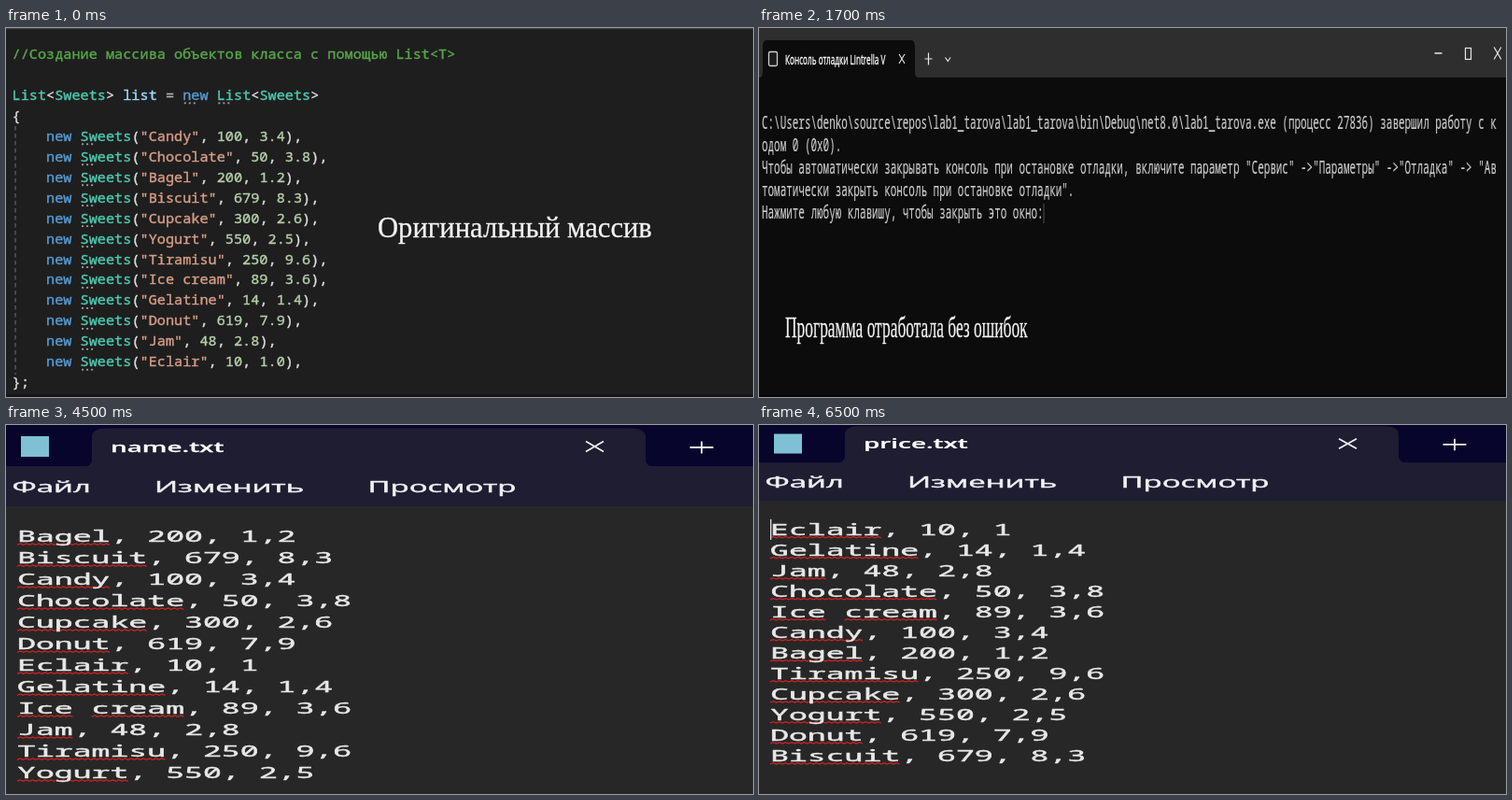
These frames come from a looping animation (800x395 px, 8000 ms). An HTML page:

```html
<!DOCTYPE html>
<html lang="ru">
<head>
<meta charset="utf-8">
<title>Сортировка списка</title>
<style>
  html, body { margin: 0; width: 100%; height: 100%; overflow: hidden; background: #1e1e1e; }
  svg { display: block; width: 100vw; height: 100vh; }
  text { white-space: pre; fill: currentColor; stroke: currentColor; }
  .mono { font-family: "Noto Sans Mono", "DejaVu Sans Mono", monospace; font-variant-ligatures: none; }
  .sans { font-family: "Open Sans", "Noto Sans", sans-serif; }
  .serif { font-family: "Liberation Serif", "Noto Serif", serif; }
</style>
</head>
<body>
<svg id="stage" viewBox="0 0 800 395" preserveAspectRatio="none"></svg>
<script>
const LOOP = 8000;
const STARTS = [0, 500, 2500, 4500, 6500];

const sweets = [
  ["Candy", 100, 3.4], ["Chocolate", 50, 3.8], ["Bagel", 200, 1.2],
  ["Biscuit", 679, 8.3], ["Cupcake", 300, 2.6], ["Yogurt", 550, 2.5],
  ["Tiramisu", 250, 9.6], ["Ice cream", 89, 3.6], ["Gelatine", 14, 1.4],
  ["Donut", 619, 7.9], ["Jam", 48, 2.8], ["Eclair", 10, 1]
];

const esc = s => s.replace(/&/g, "&amp;").replace(/</g, "&lt;").replace(/>/g, "&gt;");
const rect = (x, y, w, h, fill, extra = "") =>
  `<rect x="${x}" y="${y}" width="${w}" height="${h}" fill="${fill}" ${extra}/>`;
const line = (d, color, w = 1, extra = "") =>
  `<path d="${d}" fill="none" stroke="${color}" stroke-width="${w}" ${extra}/>`;
// sx is the horizontal scale of the text, heft thickens its strokes
const label = (cls, x, y, size, color, body, sx = 1, heft = 0, extra = "") =>
  `<text class="${cls}" transform="translate(${x} ${y}) scale(${sx} 1)" font-size="${size}" color="${color}" stroke-width="${heft}" ${extra}>${body}</text>`;
const cross = (x, y, rx, ry, color, w) =>
  line(`M${x - rx} ${y - ry}l${2 * rx} ${2 * ry}m0 ${-2 * ry}l${-2 * rx} ${2 * ry}`, color, w);
const plus = (x, y, rx, ry, color, w) =>
  line(`M${x - rx} ${y}h${2 * rx}M${x} ${y - ry}v${2 * ry}`, color, w);

// Code editor
function paint(code) {
  const rules = /(\/\/.*)|("[^"]*")|\b(new)\b|\b(List|Sweets)\b|\b(list)\b|(\d+(?:\.\d+)?)|(=)/g;
  const colors = ["#57a64a", "#d69d85", "#569cd6", "#4ec9b0", "#9cdcfe", "#b5cea8", "#b4b4b4"];
  let out = "", last = 0;
  for (const m of code.matchAll(rules)) {
    const kind = m.slice(1).findIndex(Boolean);
    out += esc(code.slice(last, m.index)) + `<tspan color="${colors[kind]}">${esc(m[0])}</tspan>`;
    last = m.index + m[0].length;
  }
  return out + esc(code.slice(last));
}

function editor() {
  const left = 6.5, step = 9.14, pitch = 21.95;
  const base = row => 33 + row * pitch;
  const hint = (col, row) => [2, 7, 12].map(dx =>
    rect(left + col * step + dx - 0.5, base(row) + 2.6, 2, 1.8, "#a0a0a0")).join("");
  const rows = [
    "//Создание массива объектов класса с помощью List<T>", "",
    "List<Sweets> list = new List<Sweets>", "{",
    ...sweets.map(([n, p, w]) => `    new Sweets("${n}", ${p}, ${w.toFixed(1)}),`),
    "};"
  ];
  return rect(0, 0, 800, 395, "#1e1e1e") +
    rect(0, 0, 800, 1.3, "#414143") + rect(0, 392.5, 800, 2.5, "#171217") +
    line("M10 105V371", "#707070", 1, 'stroke-dasharray="4.5 3.5"') +
    rows.map((r, i) => label("mono", left, base(i), step / 0.6, "#dcdcdc", paint(r), 1, 0.4)).join("") +
    hint(20, 2) + hint(24, 2) + sweets.map((s, i) => hint(8, i + 4)).join("") +
    label("serif", 398, 224, 30.6, "#f2f2f2", "Оригинальный массив", 1, 0.3);
}

// Debug console
function terminal() {
  const sx = 0.5467, ink = "#e8e8e8";
  const rows = [
    String.raw`C:\Users\denko\source\repos\lab1_tarova\lab1_tarova\bin\Debug\net8.0\lab1_tarova.exe (процесс 27836) завершил работу с к`,
    "одом 0 (0x0).",
    'Чтобы автоматически закрывать консоль при остановке отладки, включите параметр "Сервис" ->"Параметры" ->"Отладка" -> "Ав',
    'томатически закрыть консоль при остановке отладки".',
    "Нажмите любую клавишу, чтобы закрыть это окно:"
  ];
  return rect(0, 0, 800, 395, "#0c0c0c") + rect(0, 0, 800, 53, "#2e2e2e") +
    `<path d="M0 53Q4 53 4 47V20Q4 13 8 13H163Q167 13 167 20V47Q167 53 171 53Z" fill="#0c0c0c"/>` +
    rect(10.5, 25.5, 9, 15, "#1c1c1c", 'rx="1.5" stroke="#cfcfcf" stroke-width="1.3"') +
    `<clipPath id="tab"><rect x="26" y="20" width="114" height="28"/></clipPath><g clip-path="url(#tab)">` +
    label("sans", 28, 38.5, 15, "#fff", "Консоль отладки Lintrella V", sx, 0.4) + "</g>" +
    cross(153, 33, 3, 5, ink, 1.1) + plus(181.5, 33, 4, 6.5, ink, 1.2) +
    line("M199.5 31.5l2.8 4l2.8 -4", ink, 1.1) +
    line("M723.5 27h8", ink, 1.5) + rect(756.5, 21.5, 6, 12, "none", `stroke="${ink}" stroke-width="1.2"`) +
    cross(791, 27, 3.8, 6.5, ink, 1.2) +
    rows.map((r, i) => label("mono", 3, 107.7 + i * 24.1, 20, "#cccccc", esc(r), sx, 0.2)).join("") +
    rect(304.5, 188, 1, 21, "#4c4c4c") +
    label("serif", 28, 331, 31.9, "#f2f2f2", "Программа отработала без ошибок", sx, 0.3) +
    rect(0, 392.5, 800, 2.5, "#08060a");
}

// File list
function folder() {
  const page = y => `<path d="M8.5 ${y - 12}h12l4.5 4.5v16H8.5Z" fill="#f1f1f1"/>` +
    `<path d="M20.5 ${y - 12}v4.5h4.5Z" fill="#b4b4b4"/>` +
    [0, 1, 2, 3, 4].map(i => line(`M11 ${y - 5.5 + i * 2.8}h11.5`, "#8a8a8a")).join("");
  const item = (name, i) => {
    const y = 21 + i * 42.2;
    const cell = (x, s, color, size = 16.6) => label("sans", x, y + 6, size, color, s, 1, 0.15);
    return page(y) + cell(35, name, "#f2f2f2") + cell(400, "11.12.2024 6:58", "#d2d2d2") +
      cell(619, "Текстовый докум...", "#d2d2d2", 17.1);
  };
  return rect(0, 0, 800, 395, "#fff") + rect(0, 0, 800, 248.5, "#191919") +
    rect(-1, 87.5, 802, 34, "none", 'stroke="#606060"') +
    ["name", "price", "weight"].map(item).join("") +
    label("serif", 22, 210.5, 31, "#f2f2f2", "В корне проекта появились текстовые файлы", 1.048, 0.4) +
    `<circle cx="793.5" cy="390.5" r="3" fill="#222"/>`;
}

// Text viewer
function notepad(file, list, shape, caret = "") {
  const sx = 1.895, step = 19.9, left = 12, size = 16.2, ink = "#f0f0f4";
  const wave = (x, y, w) => {
    let d = `M${x} ${y}`;
    for (let i = 0; i < Math.round(w / 3.3); i++) d += `l3.3 ${i % 2 ? 1.4 : -1.4}`;
    return line(d, "#d0221f", 1.3);
  };
  const row = ([n, p, w], i) => {
    const y = 125.4 + i * 23;
    const waves = [...n.matchAll(/\S+/g)].map(m => wave(left + m.index * step, y + 3, m[0].length * step));
    return waves.join("") +
      label("mono", left, y, size, "#e8e8e8", `${n}, ${p}, ${String(w).replace(".", ",")}`, step / 0.6 / size, 0.4);
  };
  const menu = (x, s) => label("sans", x, 72, 16.8, ink, s, 1.96, 0.4);
  return rect(0, 0, 800, 395, "#272727") + `<g transform="${shape}">` +
    rect(0, -4, 800, 50, "#07052c") + rect(0, 44, 800, 43, "#1e1d31") +
    `<path d="M82 45Q92 44 92 37V13Q92 3.5 108 3.5H669Q685 3.5 685 13V37Q685 44 695 45Z" fill="#1e1d31"/>` +
    rect(16, 12, 30, 22, "#7fc0d4") +
    label("sans", 112, 28.5, 14.7, "#fff", file, sx, 0.25, 'font-weight="600"') +
    cross(630.5, 23, 9.5, 5.5, ink, 1.7) + plus(745, 24, 12.5, 6.5, ink, 1.8) +
    menu(6.5, "Файл") + menu(159, "Изменить") + menu(387.5, "Просмотр") +
    list.map(row).join("") + caret + "</g>";
}

const byName = [...sweets].sort((a, b) => a[0] < b[0] ? -1 : 1);
const byPrice = [...sweets].sort((a, b) => a[1] - b[1]);

const stage = document.getElementById("stage");
stage.innerHTML = [
  editor(), terminal(), folder(),
  notepad("name.txt", byName, "scale(1 1)"),
  notepad("price.txt", byPrice, "translate(0 -2) scale(1 .957)", rect(12, 107.5, 1.3, 23, "#dcdcdc"))
].map(s => `<g>${s}</g>`).join("");
const scenes = [...stage.children];

function show(now) {
  const t = now % LOOP;
  const current = STARTS.filter(s => s <= t).length - 1;
  scenes.forEach((g, i) => g.style.display = i === current ? "" : "none");
}

function tick() {
  show(performance.now());
  requestAnimationFrame(tick);
}
show(0);
requestAnimationFrame(tick);
</script>
</body>
</html>
```
